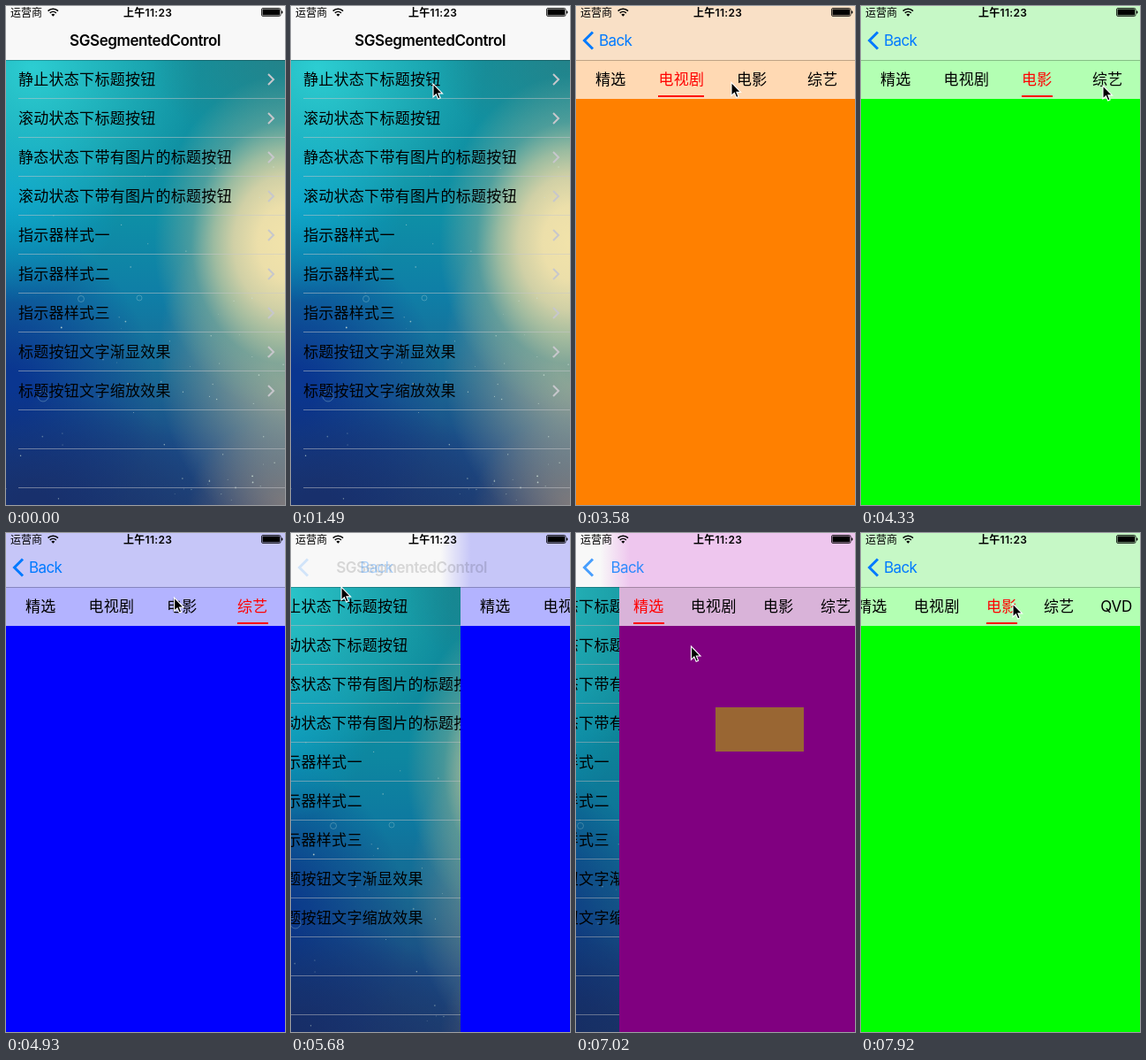
Recreate the animation shown at these times as an HTML page. Size 316x564 px, loop 8000 ms.

```html
<!DOCTYPE html>
<html lang="zh">
<head>
<meta charset="utf-8">
<style>
  html, body { margin: 0; width: 100%; height: 100%; overflow: hidden; }
  #stage { position: relative; width: 316px; height: 564px; overflow: hidden; background: #000;
    font: 17px/44px 'Noto Sans CJK SC', 'Noto Sans CJK', sans-serif; color: #000; white-space: nowrap; }
  #stage div, #stage span, #stage svg { position: absolute; }
  #stage svg { overflow: visible; fill: none; }
  #list, #page, #dim { left: 0; top: 0; width: 317px; height: 564px; overflow: hidden; }
  #list { background:
    radial-gradient(150px 190px at 318px 268px, #f2e3aa, #ecdfaa 22%, #d0d0a6 40%, #a9c0a0e8 55%, #72a89a99 72%, #3f9a9600),
    radial-gradient(150px 200px at 322px 400px, #98a294 15%, #6f8f9400),
    radial-gradient(110px 100px at 316px 564px, #756d74, #5a617200),
    radial-gradient(150px 110px at 316px 61px, #23838a, #23838a00),
    radial-gradient(190px 190px at 30px 70px, #2ccdd2, #22c2c600),
    radial-gradient(130px 120px at 0 215px, #0aa0cb, #0aa0cb00),
    radial-gradient(210px 130px at 30px 564px, #18306c 10%, #18306c00),
    radial-gradient(170px 190px at 0 440px, #0a3690 15%, #0a4a9c00),
    linear-gradient(#12929f 11%, #0e90a6 41%, #0f7ea6 58%, #1a6894 75%, #1b4a85 89%, #1f4074); }
  #dim { background: #000; }
  .row, .tab { letter-spacing: .28px; }
  .row { left: 14px; }
  .line { left: 14px; right: 0; height: 1px; background: rgba(200, 199, 204, .5); }
  #box { left: 109px; top: 197px; width: 100px; height: 50px; background: #963; }
  #tabs { left: 0; top: 61px; width: 317px; height: 44px; background: rgba(255, 255, 255, .7); overflow: hidden; }
  .tab { top: -1px; transform: translateX(-50%); }
  .latin { font-family: Inter, sans-serif; letter-spacing: -.2px; top: 0; }
  #mark { top: 40px; height: 2px; background: #f00; }
  #nav { left: 0; top: 0; width: 316px; height: 61px; border-bottom: 1px solid rgba(0, 0, 0, .25); }
  #stage #nav { background-clip: padding-box; }
  #title, #back { top: 17px; font-family: Inter, sans-serif; }
  #title { font-weight: 600; letter-spacing: -.4px; }
  #back { color: #007aff; letter-spacing: -.6px; }
  #carrier, #clock { font-size: 12px; line-height: 18px; }
  #carrier { left: 5px; top: -2px; }
  #clock { left: 133px; top: -1px; font-family: Inter, 'Noto Sans CJK SC', sans-serif; font-weight: 600; letter-spacing: .3px; }
</style>
</head>
<body>
<div id="stage">
  <div id="list"><svg id="sky" width="317" height="564"></svg></div>
  <div id="dim"></div>
  <div id="page"><div id="box"></div><div id="tabs"><div id="mark"></div></div></div>
  <div id="nav">
    <span id="title">SGSegmentedControl</span>
    <span id="back">Back</span>
    <svg id="arrow" width="30" height="60"><path d="M19 29.5 9.5 39 19 48.5" stroke="#007aff" stroke-width="3"/></svg>
    <span id="carrier">运营商</span>
    <span id="clock">上午11:23</span>
    <svg width="316" height="20">
      <path d="M47.6 5.6a8 8 0 0 1 11.4 0M49.8 7.9a5 5 0 0 1 7 0" stroke="#000" stroke-width="1.6"/>
      <path d="M53.3 11.8l-2-2.1a2.9 2.9 0 0 1 4 0z" fill="#000"/>
      <rect x="289.5" y="2.5" width="21.5" height="9" rx="1.5" stroke="#000" stroke-width=".8"/>
      <rect x="290.5" y="3.5" width="19.5" height="7" rx=".5" fill="#000"/>
      <path d="M312 5.2q1.5 .3 1.5 1.8t-1.5 1.8z" fill="#000"/>
    </svg>
  </div>
  <svg id="cursor" width="14" height="20">
    <path d="M0 0V15L3.4 11.8 5.7 17 8.1 16 5.9 10.9H10.6Z" fill="#000" stroke="#fff" stroke-width="1.1"/>
  </svg>
</div>
<script>
const $ = id => document.getElementById(id);
const LOOP = 8000, BEAT = 149; // the picture is refreshed once per beat

const mix = (a, b, u) => a + (b - a) * u;
// Smooth 0..1 ramp.
const ease = (now, start, length) => {
  const u = Math.min(1, Math.max(0, (now - start) / length));
  return u * u * (3 - 2 * u);
};

function add(parent, cls, text, top) {
  const el = document.createElement('div');
  el.className = cls;
  el.textContent = text;
  if (top !== undefined) el.style.top = top + 'px';
  parent.appendChild(el);
  return el;
}

let seed = 7;
const rnd = () => (seed = (seed * 16807) % 2147483647) / 2147483647;
let sky = '';
for (let i = 0; i < 70; i++) {
  const x = rnd() * 316, y = 110 + 454 * Math.sqrt(rnd());
  sky += `<circle cx="${x}" cy="${y}" r="${.4 + rnd() * .5}" fill="#cfe3d8" opacity="${.35 + rnd() * .5}"/>`;
}
for (const [x, y, r] of [[85, 331, 3.5], [151, 330, 3], [42, 441, 6]])
  sky += `<circle cx="${x}" cy="${y}" r="${r}" stroke="#9fd0d8" stroke-width=".8" opacity=".45"/>`;

const rows = ['静止状态下标题按钮', '滚动状态下标题按钮', '静态状态下带有图片的标题按钮',
  '滚动状态下带有图片的标题按钮', '指示器样式一', '指示器样式二', '指示器样式三',
  '标题按钮文字渐显效果', '标题按钮文字缩放效果'];
for (let i = 0; i < 11; i++) {
  const y = 61 + 44 * i;
  add($('list'), 'line', '', y + 43);
  if (!rows[i]) continue;
  add($('list'), 'row', rows[i], y - 1);
  sky += `<path d="M297 ${y + 16}l6 6-6 6" stroke="#c7c7cc" stroke-width="2"/>`;
}
$('sky').innerHTML = sky;

const names = ['精选', '电视剧', '电影', '综艺', 'QVD'];
const tabs = names.map((n, i) => add($('tabs'), i === 4 ? 'tab latin' : 'tab', n));
const widths = names.map(n => n === 'QVD' ? 34.5 : n.length * 17.25);
const even = names.map((n, i) => 39.3 + 80 * i);
let edge = 16;
const packed = widths.map(w => (edge += w + 30.4) - 30.4 - w / 2);

const pages = [
  { bg: '#800080', tint: '#eec6ee' },
  { bg: '#ff8000', tint: '#f9e0c6' },
  { bg: '#00ff00', tint: '#c6f8c6' },
  { bg: '#0000ff', tint: '#c6c6f8' }
];

// All times below are in beats.
const visits = [
  { open: 12, close: 36, centres: even, taps: [{ at: 21, tab: 1 }, { at: 26, tab: 2 }, { at: 30, tab: 3 }] },
  { open: 44, close: Infinity, centres: packed, scrolls: true, taps: [{ at: 51, tab: 2 }] }
];

const moves = [
  { from: 5, to: 10, x: 161, y: 88 },
  { from: 14, to: 18, x: 116, y: 82 },
  { from: 22, to: 25, x: 197, y: 88 },
  { from: 27, to: 29, x: 274, y: 90 },
  { from: 31, to: 36, x: 37, y: 42 },
  { from: 36, to: 38, x: 57, y: 61 },
  { from: 38, to: 41, x: 114, y: 137 },
  { from: 41, to: 43, x: 128, y: 131 },
  { from: 46, to: 53, x: 172, y: 80 }
];

function pointer(now) {
  let x = 302, y = 548;
  for (const m of moves) {
    const u = ease(now, m.from, m.to - m.from);
    x = mix(x, m.x, u);
    y = mix(y, m.y, u);
  }
  return { x, y };
}

function drawTabs(visit, now) {
  const { centres } = visit;
  let sel = 0, x = centres[0], w = widths[0], shift = 0;
  for (const { at, tab } of visit.taps) {
    if (now < at) break;
    const u = ease(now, at - 1, 2);
    sel = tab;
    x = mix(x, centres[tab], u);
    w = mix(w, widths[tab], u);
    if (visit.scrolls) shift = mix(shift, centres[tab] - 159.3, ease(now, at, 2));
  }
  tabs.forEach((tab, i) => {
    tab.style.left = centres[i] - shift + 'px';
    tab.style.color = i === sel ? '#f00' : '#000';
  });
  $('mark').style.width = w + 'px';
  $('mark').style.left = x - shift - w / 2 + 'px';
  return sel;
}

function draw(time) {
  const now = Math.floor(time / BEAT);
  const visit = visits[now < 42 ? 0 : 1];
  const p = ease(now, visit.open, 4) - ease(now, visit.close, 3.5);
  const x = 316 * (1 - p);
  const sel = drawTabs(visit, now), { bg, tint } = pages[sel];

  $('list').style.transform = `translateX(${Math.round(-95 * p)}px)`;
  $('dim').style.opacity = .1 * p;
  $('page').style.transform = `translateX(${Math.round(x)}px)`;
  $('page').style.visibility = p ? 'visible' : 'hidden';
  $('page').style.backgroundColor = bg;
  $('box').style.display = sel ? 'none' : '';

  $('nav').style.backgroundImage = p === 0 ? 'linear-gradient(#f8f8f8, #f8f8f8)'
    : p === 1 ? `linear-gradient(${tint}, ${tint})`
    : `linear-gradient(90deg, #f8f8f8 ${x - 22}px, ${tint} ${x + 12}px)`;
  $('title').style.left = 72 - 53 * p + 'px';
  $('title').style.opacity = (1 - p) ** 4;
  $('back').style.left = 26 + 86 * (1 - p) + 'px';
  $('back').style.opacity = p ** 1.3;
  $('arrow').style.opacity = p * p;

  const tip = pointer(now);
  $('cursor').style.display = now < 5 ? 'none' : '';
  $('cursor').style.transform = `translate(${tip.x}px, ${tip.y}px)`;
}

function loop() {
  draw(performance.now() % LOOP);
  requestAnimationFrame(loop);
}
loop();
</script>
</body>
</html>
```
